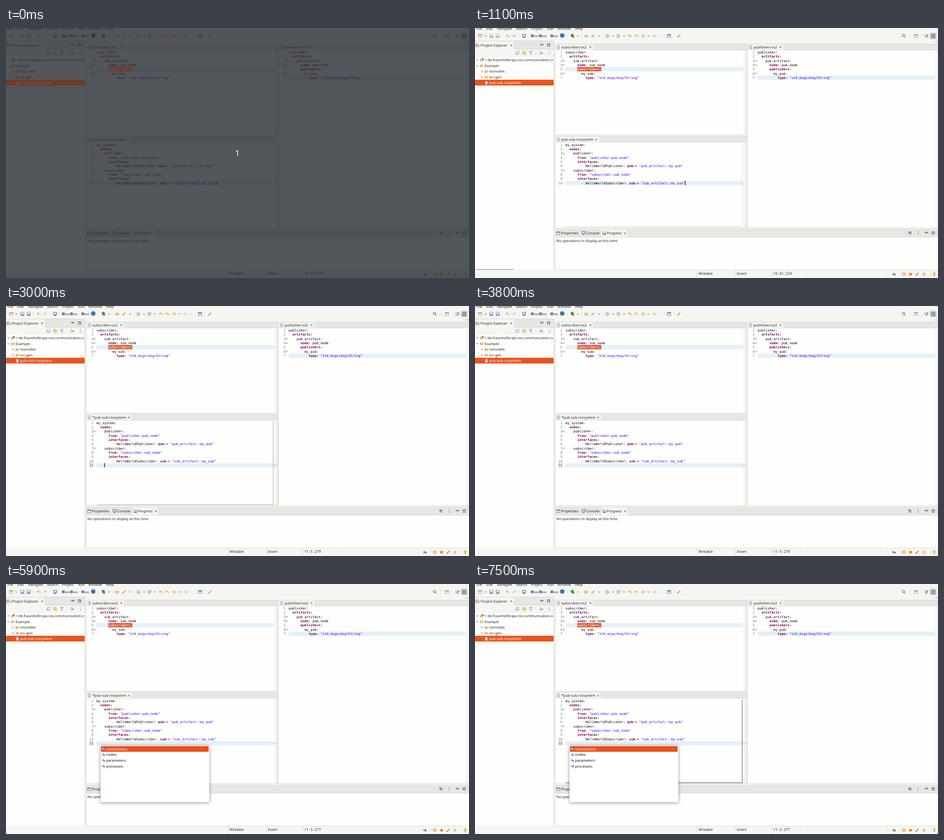
An HTML page for the animation above (8 s loop, 1019 px wide and 550 px high).

```html
<!DOCTYPE html>
<html lang="en">
<head>
<meta charset="utf-8">
<title>Editor session</title>
<style>
  html, body { margin: 0; height: 100%; overflow: hidden; background: #f5f5f1; }
  svg { display: block; width: 1019px; height: 550px; }
  text { font: 7.9px "Noto Sans", sans-serif; fill: #262626; white-space: pre; text-rendering: geometricPrecision; }
  .code { font: 7.293px "DejaVu Sans Mono", monospace; fill: #000; }
  .num { fill: #787878; }
  .key { font-weight: bold; fill: #7f0055; }
  .str { fill: #2a00ff; }
</style>
</head>
<body>
<svg id="stage" viewBox="0 0 1019 550"></svg>
<script>
const NS = "http://www.w3.org/2000/svg";
const stage = document.getElementById("stage");
const ADVANCE = 4.39, LINE = 9.3;
const BAR = "#f5f5f1", STRIP = "#e6e7e2", EDGE = "#d3d3cd", WHITE = "#fefefc";
const ORANGE = "#e8541e", BLUE = "#3d6a9e", GOLD = "#dda032", GRAY = "#b8b8b4", DARK = "#444";
let layer = stage;

function add(tag, attrs, parent = layer) {
  const node = document.createElementNS(NS, tag);
  for (const name in attrs) node.setAttribute(name, attrs[name]);
  return parent.appendChild(node);
}
const rect = (x, y, width, height, fill, more) => add("rect", { x, y, width, height, fill, ...more });
const frame = (x, y, w, h, stroke, fill = "none") => rect(x, y, w, h, fill, { stroke, "stroke-width": 0.9 });
const line = (d, stroke = DARK, width = 1) => add("path", { d, stroke, "stroke-width": width, fill: "none" });
const circle = (cx, cy, r, fill, more) => add("circle", { cx, cy, r, fill, ...more });
function text(x, y, string, more) {
  const node = add("text", { x, y, ...more });
  node.textContent = string;
  return node;
}
function group(build) {
  const outer = layer;
  const node = layer = add("g", {});
  build();
  layer = outer;
  return node;
}

// Icons, placed by their centre
const chevron = (x, y, color = DARK) => line(`M${x - 2.2} ${y - 1.1}l2.2 2.2 2.2-2.2`, color);
const closed = (x, y) => line(`M${x - 1.1} ${y - 2.2}l2.2 2.2-2.2 2.2`);
const cross = (x, y) => line(`M${x - 2.2} ${y - 2.2}l4.4 4.4m0-4.4l-4.4 4.4`, DARK, 0.9);
const dots = (x, y, color = DARK) => [-3, 0, 3].forEach(d => circle(x, y + d, 0.7, color));
const handle = (x, y = 17.5) => line(`M${x} ${y - 4}v8`, GRAY, 0.7).setAttribute("stroke-dasharray", "1 1.2");
const minimize = (x, y) => frame(x - 2.8, y - 2.2, 5.6, 1.6, DARK);
const maximize = (x, y) => { frame(x - 2.6, y - 2.6, 5.2, 5.2, DARK); line(`M${x - 2.6} ${y - 1.8}h5.2`, DARK); };
function page(x, y) {
  frame(x - 2.6, y - 3.4, 5.2, 7, "#8fa0b4", "#eef3f8");
  line(`M${x - 1.5} ${y - 1.3}h3m-3 1.5h3m-3 1.5h3`, "#8299b5", 0.6);
}
const folder = (x, y) => add("path", {
  d: `M${x - 3.2} ${y + 2.6}v-5h2.4l1 1.1h3v1m-6.4 2.9l1.3-2.9h5.4l-1.3 2.9z`,
  fill: "#fbe6bd", stroke: "#c98f2c", "stroke-width": 0.8
});
function windowIcon(x, y, color = BLUE) {
  frame(x - 3.6, y - 3, 7.2, 6, color, "#fff");
  rect(x - 3.6, y - 3, 7.2, 1.8, color);
}
function arrow(x, y, color, dir = 1) {
  add("path", {
    d: `M${x + 4 * dir} ${y}l${-3.6 * dir} -3.4v2h${-4 * dir}v2.8h${4 * dir}v2z`,
    fill: color === GRAY ? "#eee" : "#fbe3a4", stroke: color, "stroke-width": 0.8
  });
}
function bentArrow(x, y, color, dir) {
  line(`M${x - 3.4 * dir} ${y - 1}h${4 * dir}q${3 * dir} 0 ${2.4 * dir} 4m${-6.4 * dir} -4l${2.6 * dir} -2.6m${-2.6 * dir} 2.6l${2.6 * dir} 2.4`, color, 1.2);
}
function disk(x, y, color, fill) {
  frame(x - 3.6, y - 3.6, 7.2, 7.2, color, fill);
  rect(x - 2, y - 3.4, 4, 2.4, "#fff");
  rect(x - 2, y + 0.6, 4, 3, color);
}
function pencil(x, y, color = GOLD) {
  line(`M${x - 3} ${y + 3}l5.5-5.8`, color, 2);
  line(`M${x - 3.6} ${y + 3.6}l1.5-1.5`, DARK, 1);
}
function stepIcon(x, y, dir) {
  frame(x - 3, y - 3.5, 3, 3, "#7f97b5", "#fff");
  frame(x - 3, y + 1, 3, 3, "#7f97b5", "#fff");
  line(`M${x + 2.5} ${y - 3}v6m-1.7 ${dir > 0 ? "-2l1.7 2 1.7-2" : "-4l1.7-2 1.7 2"}`, GOLD);
}
function rosButton(x) {
  rect(x, 14.2, 6, 6, "#71839a");
  text(x + 6.6, 20.2, "ROS", { style: "font-size:5px;font-weight:bold;fill:#4c5a6c" });
}

function toolbar() {
  rect(0, 0, 1019, 550, BAR);
  [["File", 3], ["Edit", 25], ["Navigate", 48.5], ["Search", 90], ["Project", 123], ["Run", 159], ["Window", 181], ["Help", 220]]
    .forEach(([name, x]) => text(x, 4, name));
  const y = 17.5;
  windowIcon(11, y, "#a9924f");
  circle(14, 15, 1.8, GOLD);
  [23, 227, 273, 304, 328, 382].forEach(x => chevron(x, y));
  chevron(407, y, GRAY);
  [60, 97, 119, 203, 236, 283, 416, 438].forEach(x => handle(x));
  disk(36, y, "#a2a8af", "#dcdfe2");
  disk(50, y, "#a2a8af", "#dcdfe2");
  bentArrow(72, y, GOLD, 1);
  bentArrow(86, y, GRAY, -1);
  frame(104.8, 14, 6.8, 5.6, "#2d538a", "#dbe6f2");
  rect(106.5, 20, 3.4, 1.5, "#2d538a");
  [123, 141, 166].forEach(rosButton);
  circle(192, 16.5, 5, "#3579b5");
  circle(214, 16.2, 3.5, "#37a04a");
  rect(214, 18.4, 4, 2.8, "#b5472f");
  folder(245, y);
  pencil(260, y);
  stepIcon(292, y, 1);
  stepIcon(316, y, -1);
  bentArrow(341, y, GOLD, 1);
  bentArrow(355, y, GOLD, 1);
  arrow(370, y, GOLD, -1);
  arrow(395, y, GRAY);
  windowIcon(427, y);
  circle(430, 15, 1.4, "#4a9a5b");
  pencil(449, y);
  circle(943, 16.5, 2.7, "none", { stroke: DARK });
  line("M945 18.6l3 3");
  handle(957);
  windowIcon(970.5, y, "#8b8e78");
  circle(973.6, 15, 1.6, GOLD);
  handle(983);
  windowIcon(993, y, "#a3b8d2");
  pencil(995, y, "#6f8fb8");
  rect(1002, 11, 13, 13, "#dededa", { stroke: "#aaa", "stroke-width": 0.8, rx: 1 });
  for (let i = 0; i < 9; i++) rect(1004.3 + i % 3 * 3.2, 13.4 + Math.floor(i / 3) * 3.2, 2, 2, "#333");
  rect(1009, 30, 3.5, 1, GRAY);
  frame(1014.5, 29, 3, 2.8, GRAY);
}

function explorer() {
  rect(0, 29, 173, 18, STRIP);
  rect(0, 29, 86, 18, BAR);
  rect(0, 47, 173, 17, BAR);
  rect(0, 64, 173, 468, WHITE);
  line("M0 28.7h173.5v503.5M86.5 29v17.5h87", EDGE);
  frame(2, 35, 4, 6, BLUE, "#fff");
  folder(7, 39);
  text(12.5, 40.8, "Project Explorer");
  cross(79.5, 38);
  minimize(147, 38);
  maximize(162, 37.5);
  frame(90, 53, 5, 5, "#8a9ab0", "#fff");
  frame(92, 51.5, 5, 5, "#8a9ab0", "#fff");
  arrow(107, 53.5, GOLD, -1);
  arrow(109, 56.5, GOLD);
  line("M119.5 51.5h6.5l-2.5 3.3v3.5l-1.5-1v-2.5z", "#6889b0", 0.9);
  handle(134, 55);
  frame(142.5, 52, 3.4, 6, GRAY, "#ddd");
  line("M145 55.5h4.5m-2-2l2 2-2 2", "#777");
  dots(163.5, 55);

  rect(0, 113.8, 173, 12.7, ORANGE);
  closed(5, 70); chevron(5, 83); closed(15, 95.5); closed(15, 108);
  folder(15, 70.5);
  rect(15.5, 66.5, 3.5, 3, BLUE);
  folder(15, 83); folder(25, 95.7); folder(25, 108.2);
  page(25, 120.5);
  const clip = add("clipPath", { id: "tree" });
  add("rect", { x: 0, y: 64, width: 172.5, height: 60 }, clip);
  text(21, 72.8, "> de.fraunhofer.ipa.ros.communication.o", { "clip-path": "url(#tree)" });
  text(21, 85.6, "Example");
  text(31, 98.2, "rosnodes");
  text(31, 110.8, "src-gen");
  text(31, 123.3, "pub-sub.rossystem", { style: "fill:#fff" });
}

function panel(x, y, w, h, tabWidth) {
  rect(x, y, w, h, WHITE);
  rect(x, y, w, 13, STRIP);
  const tab = rect(x, y, tabWidth, 13, BAR);
  rect(x + w - 7, y + 13, 7, h - 13, BAR);
  frame(x, y, w, h, EDGE);
  line(`M${x} ${y + 13}h${w}`, EDGE, 0.7);
  page(x + 7, y + 6.5);
  return tab;
}

// *...* marks keywords, "..." marks strings
function codeLine(x, y, number, source, folds) {
  text(x - 6.6, y, number, { class: "code num", "text-anchor": "end" });
  if (folds) {
    circle(x - 4, y - 2.6, 1.9, "#f2f4f6", { stroke: "#9aa6b2", "stroke-width": 0.6 });
    line(`M${x - 5.1} ${y - 2.6}h2.2`, "#667", 0.6);
  }
  const indent = source.search(/\S/);
  if (indent < 0) return;
  const node = text(x + indent * ADVANCE, y, "", { class: "code" });
  source.trim().split(/(\*[^*]+\*|"[^"]*")/).filter(Boolean).forEach(part => {
    const kind = part[0] === "*" ? "key" : part[0] === '"' ? "str" : "";
    add("tspan", { class: kind }, node).textContent = part.replace(/\*/g, "");
  });
}
const code = (x, y, folds, lines) =>
  lines.forEach((source, i) => codeLine(x, y + i * LINE, i + 1, source, folds.includes(i + 1)));

const rosNode = (side, name) => [
  `${name}:`, "  *artifacts:*", `    ${side}_artifact:`, `      *node:* ${side}_node`,
  `      *${name}s:*`, `        my_${side}:`, '          *type:* "std_msgs/msg/String"'
];
const systemNode = (side, name, label) => [
  `    ${name}:`, `      *from:* "${name}.${side}_node"`, "      *interfaces:*",
  `        - HelloWorld${label}: *${side}->* "${side}_artifact::my_${side}"`
];

function bottomPanel() {
  rect(176.5, 443, 843, 89, WHITE);
  rect(176.5, 443, 843, 17, STRIP);
  rect(277.5, 443, 58.5, 17, BAR);
  line("M1019 442.5h-842.5v89.7H1019M176.5 460.3H1019M277.5 443v17M336 443v17", EDGE, 0.8);
  windowIcon(183, 451.5, "#5d7596");
  text(189, 454.2, "Properties");
  frame(235.8, 447.5, 6.4, 5.5, "#2d538a", "#dbe6f2");
  rect(237.5, 453.5, 3, 1.3, "#2d538a");
  text(244.5, 454.2, "Console");
  frame(281, 448.5, 6, 3.2, "#888", "#fff");
  rect(281, 453, 4, 2, "#43a354");
  circle(286.5, 453.4, 1.8, "#43a354");
  text(290, 454.2, "Progress");
  cross(330, 451.5);
  cross(955.8, 450.5); cross(958.5, 452.5);
  line("M953.5 449h7", DARK);
  dots(975.3, 451);
  minimize(993.5, 451.5);
  maximize(1008.5, 451);
  text(179, 470.7, "No operations to display at this time.");
}

function statusBar() {
  line("M488.5 533v15M572.5 533v15M653.5 533v15", EDGE);
  text(492, 543.3, "Writable");
  text(576, 543.3, "Insert");
  [732, 908, 935, 1003].forEach(x => handle(x, 541.5));
  circle(921, 541.5, 2.8, "#a8a48c");
  rect(922, 541, 4, 3, "#6d7d70");
  frame(940.5, 539, 6.4, 5, "#d98a35", "#fbe9d2");
  line("M942.5 539v5m2.2-5v5", "#d98a35", 0.6);
  add("path", { d: "M954 541l4.8-2.4 4.4 2.4-4.4 2.2z", fill: "#dd8420" });
  rect(956, 542.5, 5, 2, "#dd8420");
  pencil(973.5, 541.5, "#dd8420");
  circle(988, 541.8, 2.8, "#fdebd2", { stroke: "#dd9440" });
  circle(988, 541.8, 0.8, "#dd9440");
  circle(1010.8, 540.2, 2.6, "#f7cf5a", { stroke: "#d9a12e", "stroke-width": 0.7 });
  rect(1009.7, 543, 2.2, 2.6, "#888");
}

toolbar();
const savedIcons = group(() => [36, 50].forEach(x => disk(x, 17.5, "#7890b0", "#c6d3e3")));
explorer();
const treeScroll = rect(1, 530.5, 84, 1.4, "#999");

panel(176.5, 35.5, 421, 200, 83);
text(190, 44.7, "subscriber.ros2");
cross(253.8, 42);
rect(199, 86, 391, LINE, "#e4f0fa");
rect(225, 86, 53, LINE, ORANGE);
code(199, 56, [3, 4, 6], rosNode("sub", "subscriber"));
text(199 + 6 * ADVANCE, 56 + 4 * LINE, "subscribers:", { class: "code key", style: "fill:#fff" });

panel(599.5, 35.5, 420, 403.5, 79);
text(613, 44.7, "publisher.ros2");
cross(672.5, 42);
rect(622, 104.6, 390, LINE, "#e4f0fa");
code(622, 56, [3, 4, 6], rosNode("pub", "publisher"));

const systemTab = panel(176.5, 238.5, 421, 200.5, 97);
const tabTitle = text(190, 248.4, "");
const tabCross = cross(267, 245.5);
const currentLine = rect(199, 336, 391, LINE, "#e4f0fa");
const newLine = group(() => {
  rect(183, 345.5, 10, LINE, "#dededb");
  frame(590.5, 348.8, 5.5, 3, "#c5d3df", "#e6eef5");
  codeLine(199, 259.8 + 10 * LINE, 11, "", false);
});
code(199, 259.8, [3, 7], ["my_system:", "  *nodes:*",
  ...systemNode("pub", "publisher", "Publisher"), ...systemNode("sub", "subscriber", "Subscriber")]);
const caret = rect(0, 0, 1.3, 9.6, "#000");
const editorScroll = group(() => {
  rect(587.5, 254.5, 1.5, 183, "#808080");
  rect(199.5, 436.5, 389.5, 1.5, "#808080");
});

bottomPanel();
statusBar();
const position = text(656.5, 543.3, "");

const popup = group(() => {
  rect(208, 355.5, 239.5, 124.5, "#fff", { style: "filter:drop-shadow(0 1.5px 3.5px rgba(0,0,0,.45))" });
  rect(209, 356.6, 237, 12.6, ORANGE);
  ["connections:", "nodes:", "parameters:", "processes:"].forEach((label, i) => {
    const y = 363 + i * 12.6;
    frame(211.7, y - 2.3, 3, 3.6, "#6f8bb0", "#e8eff7");
    rect(214, y - 1, 4, 3.6, "#7d97b8");
    text(220.3, y + 2.8, label, { style: i ? "fill:#111" : "fill:#fff" });
  });
});

const countdown = group(() => {
  rect(0, 0, 1019, 550, "#282c33", { opacity: 0.8 });
  rect(0, 113.8, 173, 12.7, ORANGE, { opacity: 0.22 });
  rect(225, 86, 53, LINE, ORANGE, { opacity: 0.22 });
  text(509, 281, "1", { style: "font-size:17px;fill:#fff", "text-anchor": "middle" });
});

// start time, line, column, caret visible
const moves = [
  [0, 10, 61, 1], [2200, 11, 9, 1], [2800, 11, 5, 1], [3300, 11, 5, 0], [4200, 11, 5, 1],
  [4500, 11, 1, 1], [5000, 11, 1, 0], [5100, 11, 3, 1], [5500, 11, 3, 0]
];
const ramp = (t, from, to) => Math.min(1, Math.max(0, (t - from) / (to - from)));
const show = (node, visible) => node.setAttribute("visibility", visible ? "visible" : "hidden");

function draw(time) {
  const t = Math.floor(time % 8000 / 100) * 100;
  const [, row, column, visible] = moves.findLast(move => move[0] <= t);
  const dirty = row === 11;
  const top = 252.8 + (row - 1) * LINE;

  show(countdown, t < 100);
  show(savedIcons, dirty);
  show(newLine, dirty);
  show(caret, visible);
  show(popup, t >= 5700);
  tabTitle.textContent = (dirty ? "*" : "") + "pub-sub.rossystem";
  tabCross.setAttribute("transform", `translate(${dirty ? 3.8 : 0} 0)`);
  systemTab.setAttribute("width", dirty ? 100.5 : 97);
  currentLine.setAttribute("y", top);
  caret.setAttribute("x", 198.6 + (column - 1) * ADVANCE);
  caret.setAttribute("y", top - 0.3);
  position.textContent = [row, column, (dirty ? 274 : 213) + column].join("\u2009:\u2009");
  treeScroll.setAttribute("opacity", ramp(t, 500, 900) - ramp(t, 2100, 2500));
  editorScroll.setAttribute("opacity", ramp(t, 1000, 1600) - ramp(t, 2700, 3300) + ramp(t, 6600, 7100));
}

const start = performance.now();
function tick() {
  draw(performance.now() - start);
  requestAnimationFrame(tick);
}
tick();
</script>
</body>
</html>
```
